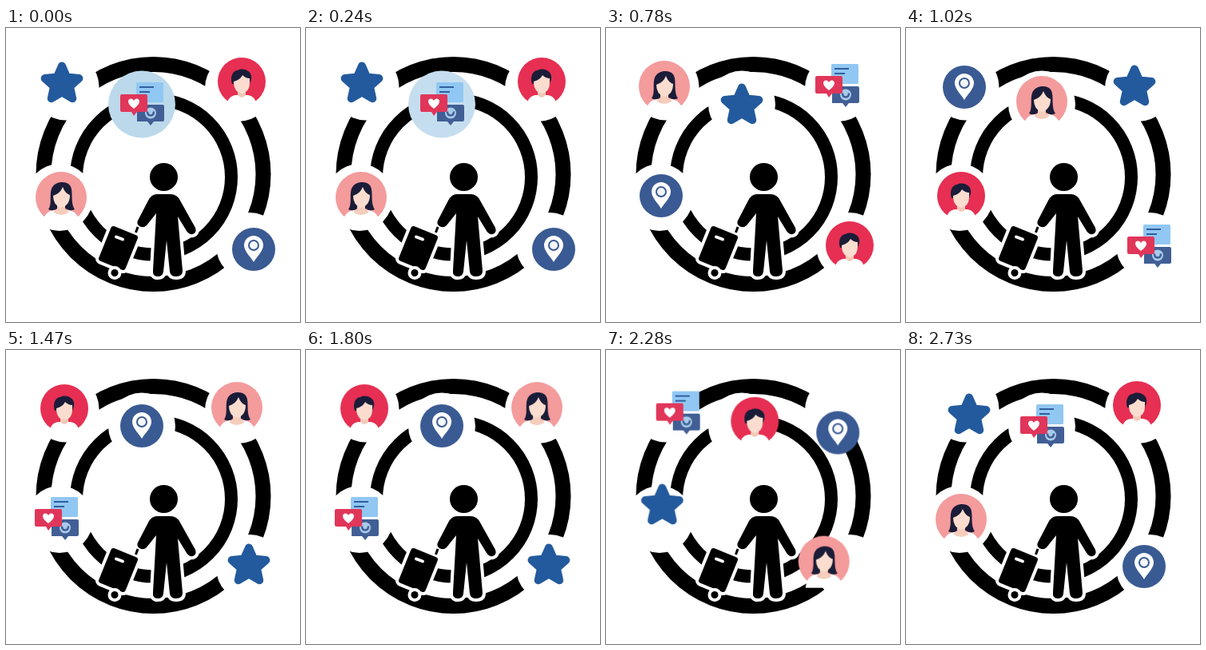
These frames come from a looping animation (368 by 368 pixels, 2.76 s). An HTML page:

```html
<!DOCTYPE html>
<html lang="en">
<head>
<meta charset="utf-8">
<title>Traveller and orbiting icons</title>
<style>
html, body { margin: 0; width: 100%; height: 100%; overflow: hidden; background: #fff; }
svg { display: block; width: 100vw; height: 100vh; }
.item { animation: hop 2760ms cubic-bezier(.45, 0, .55, 1) infinite; }
.glow { animation: pale 2760ms linear infinite; }

@keyframes hop {
  0%, 16.28% { transform: var(--a); }
  20.62%, 32.58% { transform: var(--b); }
  36.93%, 48.88% { transform: var(--c); }
  53.23%, 65.19% { transform: var(--d); }
  69.54%, 81.49% { transform: var(--e); }
  85.84%, 100% { transform: var(--f); }
}
@keyframes pale {
  0% { fill: #bbd9eb; }
  17.4% { fill: #cfe3f2; }
  20.6%, 100% { fill: #fff; }
}

#star {
  --a: translate(70px, 68px); --b: translate(170px, 95px); --c: translate(286px, 72px);
  --d: translate(304px, 268px); --e: translate(69px, 211px); --f: translate(79px, 80px);
}
#chat {
  --a: translate(171px, 95px); --b: translate(290px, 72px); --c: translate(305px, 273px);
  --d: translate(64px, 211px); --e: translate(78px, 76px); --f: translate(171px, 95px);
}
#man {
  --a: translate(295px, 67px); --b: translate(305px, 272px); --c: translate(69px, 210px);
  --d: translate(73px, 73px); --e: translate(170px, 92px); --f: translate(289px, 69px);
}
#pin {
  --a: translate(310px, 277px); --b: translate(69px, 210px); --c: translate(73px, 74px);
  --d: translate(170px, 95px); --e: translate(289px, 77px); --f: translate(298px, 271px);
}
#woman {
  --a: translate(69px, 212px); --b: translate(73px, 73px); --c: translate(170px, 92px);
  --d: translate(289px, 72px); --e: translate(305px, 273px); --f: translate(69px, 212px);
}
</style>
</head>
<body>
<svg viewBox="0 0 368 368">
  <defs>
    <g id="walker">
      <circle cx="197.500" cy="186.500" r="17.500"/>
      <path d="M189 208H206Q214 208 218 216L237 250Q239 256 234 258Q229 259 226 254L215 236L221 304Q221 311 213 311Q206 311 205 305L201 266L197 305Q196 311 190 311Q183 311 184 303L188 232L176 247Q172 251 167 248Q163 245 165 241L178 216Q182 208 189 208Z"/>
    </g>
    <rect id="case" x="-18" y="-23.500" width="36" height="47" rx="3.500" transform="translate(140.500 275.500) rotate(22)"/>
  </defs>

  <g fill="none" stroke="#000">
    <circle cx="184.500" cy="183" r="137.500" stroke-width="19"/>
    <circle cx="185" cy="186.500" r="97" stroke-width="16"/>
  </g>

  <g fill="#fff">
    <circle cx="74.500" cy="73.500" r="42"/>
    <circle cx="291" cy="75" r="42"/>
    <circle cx="305" cy="273" r="42"/>
    <circle cx="67" cy="212" r="42"/>
    <circle class="glow" cx="170" cy="95.500" r="42"/>
  </g>

  <g stroke="#fff" stroke-width="8" stroke-linejoin="round">
    <use href="#case"/><use href="#walker"/>
  </g>
  <use href="#case"/>
  <path d="M162.500 256L165 249" stroke="#000" stroke-width="3"/>
  <path d="M138 261.500L146 264.500" stroke="#fff" stroke-width="4" stroke-linecap="round"/>
  <circle cx="136" cy="306.500" r="8.500" fill="#fff"/>
  <circle cx="136" cy="306.500" r="4.500"/>
  <use href="#walker"/>

  <g class="item" id="pin">
    <circle r="27" fill="#3a5a93"/>
    <path d="M0 16C-5 8-12 2-12-5A12 12 0 0 1 12-5C12 2 5 8 0 16Z" fill="#fff"/>
    <circle cy="-5" r="6" fill="#f4f7fb" stroke="#3a5a93" stroke-width="2"/>
  </g>

  <g class="item" id="woman">
    <circle r="32" fill="#f49b9c"/>
    <path d="M-23 33Q-22 18-9 16H9Q22 18 23 33Z" fill="#fff"/>
    <path d="M-16 15C-11 8-15-3-12-11C-8-21 7-21 11-15C16-9 11 6 17 15Q11 18 6 14H-5Q-10 18-16 15Z" fill="#1b1d38"/>
    <path d="M-5 6H5V15Q10 17 9 19Q0 25-9 19Q-10 17-5 15Z" fill="#f5cdbc"/>
    <path d="M-10-2Q-1-5 2-13Q5-5 11-3Q11 10 0 13Q-10 10-10-2Z" fill="#fbddcf"/>
  </g>

  <g class="item" id="man">
    <circle r="30" fill="#e62f52"/>
    <path d="M-19 34Q-19 19-8 17H8Q19 19 19 34Z" fill="#fff"/>
    <path d="M-5 8H5V17Q0 23-5 17Z" fill="#f3c8b7"/>
    <path d="M-12 3C-15-6-11-14-5-14C2-18 14-13 12-3L10 3H-10Z" fill="#1b1d38"/>
    <path d="M-10 0Q-2-2 1-8Q5-4 10-4V2Q10 13 0 15Q-10 13-10 0Z" fill="#fbddcf"/>
  </g>

  <g class="item" id="chat">
    <rect x="-8" y="-27" width="34" height="25" rx="1.500" fill="#91c7f3"/>
    <path d="M-4-21H14M-4-15H9" stroke="#315f9f" stroke-width="2.200"/>
    <path d="M-7 1H25Q27 1 27 3V20Q27 22 25 22H14L10 27L6 22H-7Z" fill="#415f95"/>
    <circle cx="10" cy="11.500" r="7" fill="#a9cbea"/>
    <path d="M6 9.500Q6 14.500 10 14.500Q14 14.500 14 9.500" fill="none" stroke="#415f95" stroke-width="2.500"/>
    <path d="M-26-12H4Q6-12 6-10V8Q6 10 4 10H-7L-11 15L-14 10H-26Q-28 10-28 8V-10Q-28-12-26-12Z" fill="#e0365a"/>
    <path d="M-11 6C-15 3-18 0-18-3C-18-7-13-8-11-4C-9-8-4-7-4-3C-4 0-7 3-11 6Z" fill="#fff"/>
  </g>

  <g class="item" id="star">
    <path id="starShape" fill="#235a9d" stroke="#235a9d" stroke-width="10" stroke-linejoin="round"/>
  </g>
</svg>
<script>
const tips = Array.from({ length: 10 }, (_, i) => {
  const r = i % 2 ? 10.5 : 22.5, a = (i * 36 - 90) * Math.PI / 180;
  return `${(r * Math.cos(a)).toFixed(2)} ${(2 + r * Math.sin(a)).toFixed(2)}`;
});
document.getElementById("starShape").setAttribute("d", `M${tips.join("L")}Z`);
</script>
</body>
</html>
```
